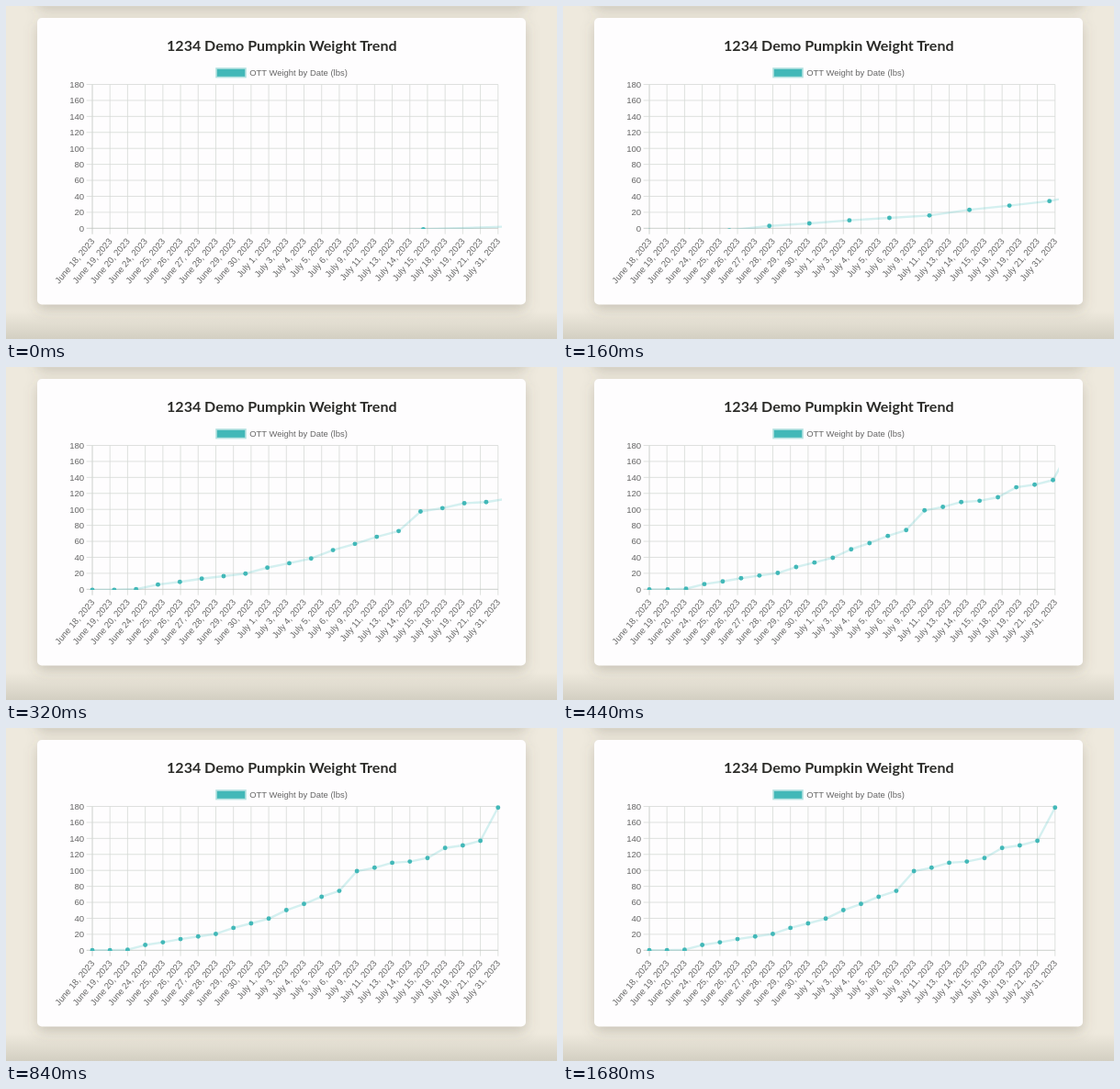
Write an HTML page that moves like this. It is 600 px wide and 363 px high and loops after 1960 ms.

```html
<!DOCTYPE html>
<html lang="en">
<head>
<meta charset="utf-8">
<title>Weight trend</title>
<style>
  html, body { margin: 0; width: 100%; height: 100%; overflow: hidden; background: #eee9dd; }
  svg { display: block; width: 600px; height: 363px; }
  text { font-family: "Liberation Sans", Arial, sans-serif; font-size: 9.6px; fill: #666; }
  .title { font-family: Lato, sans-serif; font-size: 16px; font-weight: 700; fill: #2b2b28; }
</style>
</head>
<body>
<svg viewBox="0 0 600 363" xmlns="http://www.w3.org/2000/svg">
  <defs>
    <linearGradient id="fade" x1="0" y1="0" x2="0" y2="1">
      <stop offset="0" stop-color="#d3cfc2" stop-opacity="0"/>
      <stop offset="1" stop-color="#d3cfc2"/>
    </linearGradient>
    <filter id="soft" x="-10%" y="-20%" width="120%" height="140%">
      <feGaussianBlur stdDeviation="7"/>
    </filter>
    <clipPath id="area"><rect x="90" y="81" width="450" height="161.9"/></clipPath>
  </defs>
  <rect width="600" height="363" fill="#eee9dd"/>
  <rect y="333" width="600" height="30" fill="url(#fade)"/>
  <g fill="#5c5a48" filter="url(#soft)">
    <rect x="34" y="-40" width="532" height="44" rx="5" opacity=".25"/>
    <rect x="34" y="19" width="532" height="312" rx="5" opacity=".25"/>
  </g>
  <rect x="34" y="-10" width="532" height="10.5" rx="5" fill="#dedacd"/>
  <rect x="34" y="13" width="532" height="312.5" rx="5" fill="#fefdfe"/>
  <text class="title" x="300.3" y="48.6" text-anchor="middle">1234 Demo Pumpkin Weight Trend</text>
  <rect x="229" y="68" width="32" height="9.6" fill="#42b8b8" stroke="#b4e2e0" stroke-width="1.6"/>
  <text x="265.2" y="76.2" style="font-size:9.45px">OTT Weight by Date (lbs)</text>
  <g id="grid" stroke-width=".8"></g>
  <g id="labels"></g>
  <g clip-path="url(#area)">
    <polyline id="line" fill="none" stroke="#4bc0c0" stroke-opacity=".23" stroke-width="2.4" stroke-linejoin="round"/>
    <g id="dots" fill="#42b8b8"></g>
  </g>
</svg>
<script>
const LOOP = 1960, STEP = 40, TICK = 1000 / 60;
const LEFT = 94, RIGHT = 535.8, TOP = 85.5, BOTTOM = 242.3;
const HEAD_START = 360, DURATION = 1000, START_Y = 292;

const weights = [0, 0, .7, 6.6, 10, 14, 17.3, 20.5, 28, 33.6, 39.6, 50.2, 58, 67, 74.3,
  99, 103.3, 109.5, 111, 115.5, 128, 131.2, 137, 178.6];
const dates = [
  ...[18, 19, 20, 24, 25, 26, 27, 28, 29, 30].map(d => `June ${d}, 2023`),
  ...[1, 3, 4, 5, 6, 9, 11, 13, 14, 15, 18, 19, 21, 31].map(d => `July ${d}, 2023`)
];

const $ = id => document.getElementById(id);
const gap = (RIGHT - LEFT) / (dates.length - 1);
const yOf = w => BOTTOM - w / 180 * (BOTTOM - TOP);

function add(parent, tag, attrs, text) {
  const el = document.createElementNS("http://www.w3.org/2000/svg", tag);
  for (const key in attrs) el.setAttribute(key, attrs[key]);
  if (text !== undefined) el.textContent = text;
  return parent.appendChild(el);
}

function rule(x1, y1, x2, y2, strong) {
  add($("grid"), "line", { x1, y1, x2, y2, stroke: strong ? "#bfc3bf" : "#d6dad6" });
}

dates.forEach((date, i) => {
  const x = LEFT + i * gap;
  rule(x, TOP, x, BOTTOM + 6.4, i === 0);
  add($("labels"), "text", {
    "text-anchor": "end", y: 3.4,
    transform: `translate(${x + .3} 254.5) rotate(-50)`
  }, date);
});
for (let w = 0; w <= 180; w += 20) {
  const y = yOf(w);
  rule(LEFT - 6.4, y, RIGHT, y, w === 0);
  add($("labels"), "text", { x: 85.2, y: y + 3.4, "text-anchor": "end" }, w);
}

const dots = weights.map(() => add($("dots"), "circle", { r: 2.45 }));

// Points ease out from a two-label axis with a lower baseline.
function draw(ms) {
  const shown = Math.floor(ms / STEP) * STEP;
  const elapsed = HEAD_START + Math.floor(shown / TICK) * TICK;
  const rest = Math.max(0, 1 - elapsed / DURATION) ** 4;
  const spread = gap + (RIGHT - LEFT - gap) * rest;
  const points = weights.map((w, i) => {
    const y = yOf(w);
    return [LEFT + i * spread, y + (START_Y - y) * rest];
  });
  $("line").setAttribute("points", points.map(p => p.map(n => n.toFixed(2)).join()).join(" "));
  points.forEach(([x, y], i) => {
    dots[i].setAttribute("cx", x.toFixed(2));
    dots[i].setAttribute("cy", y.toFixed(2));
  });
}

const begin = performance.now();
function frame() {
  draw((performance.now() - begin) % LOOP);
  requestAnimationFrame(frame);
}
draw(0);
requestAnimationFrame(frame);
</script>
</body>
</html>
```
